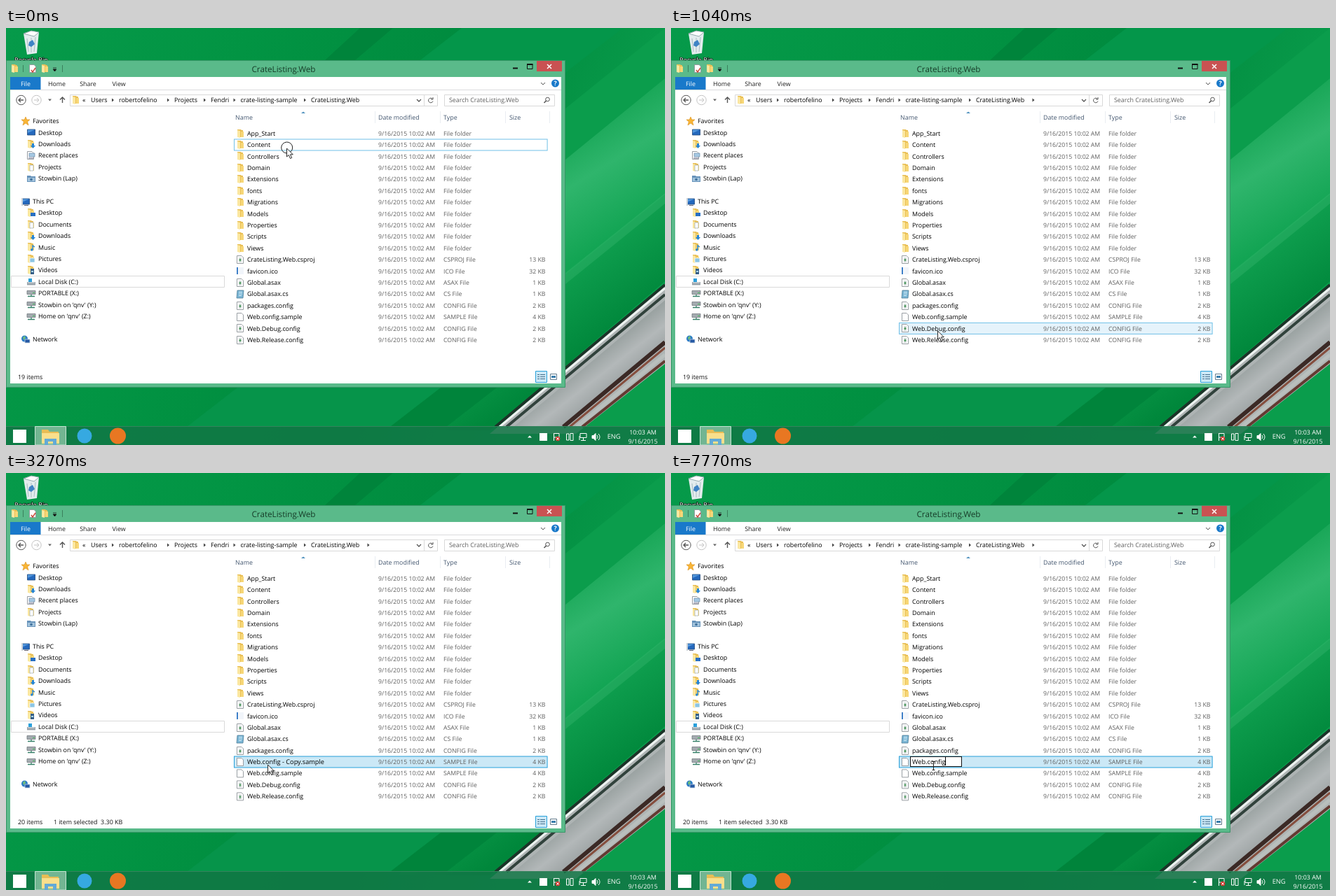
Recreate the animation shown at these times as an HTML page. Size 940 px wide and 596 px high, loop 8000 ms.

```html
<!DOCTYPE html>
<html lang="en">
<head>
<meta charset="utf-8">
<title>File window</title>
<style>
html, body { margin: 0; width: 100%; height: 100%; overflow: hidden; background: #088f45; }
svg { display: block; width: 100%; height: 100%; font: 8.9px "Open Sans", "Noto Sans", sans-serif; text-rendering: geometricPrecision; }
text { white-space: pre; }
.line { fill: none; stroke: #555; }
.meta { fill: #5f5f5f; font-size: 8.7px; }
.head { fill: #43566f; }
.white { fill: #fff; }
</style>
</head>
<body>
<svg viewBox="0 0 940 596" xmlns="http://www.w3.org/2000/svg">
<defs>
  <linearGradient id="sky" x2="1" y2=".25">
    <stop offset="0" stop-color="#069a4a"/><stop offset=".35" stop-color="#029443"/>
    <stop offset=".7" stop-color="#008a3e"/><stop offset="1" stop-color="#0a9d4c"/>
  </linearGradient>
  <linearGradient id="glow" gradientUnits="userSpaceOnUse" x1="815" y1="110" x2="915" y2="270">
    <stop offset="0" stop-color="#0d9f4c"/><stop offset=".5" stop-color="#2fb56c"/><stop offset="1" stop-color="#12a453"/>
  </linearGradient>
  <linearGradient id="deep" gradientUnits="userSpaceOnUse" x1="820" y1="300" x2="900" y2="410">
    <stop offset="0" stop-color="#12a453"/><stop offset="1" stop-color="#00873b"/>
  </linearGradient>
  <linearGradient id="steel" gradientUnits="userSpaceOnUse" x1="800" y1="482" x2="850" y2="546">
    <stop offset="0" stop-color="#8c9694"/><stop offset=".5" stop-color="#b3b8b9"/><stop offset="1" stop-color="#929999"/>
  </linearGradient>
  <clipPath id="picked"><rect id="pickedBox" y="406.5" height="12"/></clipPath>

  <symbol id="folder" overflow="visible">
    <path d="M1 0H6L7 1H9V11H1Z" fill="#e9bf55"/><path d="M1 1L5 2V12L1 11Z" fill="#fbe7a0"/><path d="M6 3H10V11H6Z" fill="#f7d778"/>
  </symbol>
  <symbol id="page" overflow="visible"><path d="M.5 .5H7L9.500 3V11.500H.5Z" fill="#fff" stroke="#8e9499" stroke-width=".9"/></symbol>
  <symbol id="config" overflow="visible">
    <use href="#page"/><path d="M3 4H7M3 9H7" stroke="#9aa" stroke-width=".8"/><circle cx="5" cy="6.5" r="1.7" fill="#579b67"/>
  </symbol>
  <symbol id="picture" overflow="visible"><path d="M0 1H2V11H0Z" fill="#3f80c8"/><path d="M3 1H10V11H3Z" fill="#f1f5fa"/></symbol>
  <symbol id="code" overflow="visible"><path d="M1 1H10L9 12H0Z" fill="#78b4d4" stroke="#517f99" stroke-width=".8"/><path d="M3 3.5H8M3 6H8M3 8.5H7" stroke="#d9eff8"/></symbol>
  <symbol id="star" overflow="visible"><path d="M6 0L7.7 4H12L8.7 7L10 12L6 9L2 12L3.3 7L0 4H4.3Z" fill="#f8b536" stroke="#d98d18" stroke-width=".6"/></symbol>
  <symbol id="screen" overflow="visible"><path d="M.5 2H11.5V10H.5Z" fill="#2468bd" stroke="#234a7d" stroke-width=".8"/><path d="M1 2.5H11L1 7Z" fill="#5397dc"/></symbol>
  <symbol id="pc" overflow="visible"><use href="#screen"/><path d="M0 1H2V12H0Z" fill="#cfd5da"/><path d="M4 11.5H10" stroke="#667"/></symbol>
  <symbol id="down" overflow="visible"><use href="#folder"/><path d="M7 5H10V8H12L8.5 12L5 8H7Z" fill="#2484d6"/></symbol>
  <symbol id="deskfolder" overflow="visible"><use href="#folder"/><path d="M5 6H12V11H5Z" fill="#286fc4"/></symbol>
  <symbol id="recent" overflow="visible"><use href="#page"/><path d="M3 3H11V8H3Z" fill="#a6c9e4" stroke="#6c8ca6" stroke-width=".7"/><path d="M2 10H9" stroke="#668"/></symbol>
  <symbol id="docs" overflow="visible"><use href="#folder"/><path d="M4 3H9V11H4Z" fill="#fff" stroke="#9ba6ae" stroke-width=".7"/></symbol>
  <symbol id="music" overflow="visible"><use href="#folder"/><path d="M8 3V10M8 4L11 6" stroke="#2484d6" stroke-width="1.4"/><circle cx="6.8" cy="10" r="1.7" fill="#2484d6"/></symbol>
  <symbol id="pics" overflow="visible"><use href="#folder"/><path d="M4 5H11V11H4Z" fill="#8bc5e4" stroke="#fff" stroke-width=".7"/></symbol>
  <symbol id="film" overflow="visible"><use href="#folder"/><path d="M5 4H10V12H5Z" fill="#365f88"/><path d="M6 7H9V9H6Z" fill="#acd6ed"/></symbol>
  <symbol id="shared" overflow="visible"><path d="M0 2H5L6 3H12V11H0Z" fill="#6793ba"/><path d="M1 5H11V10H1Z" fill="#a3c3dc"/><circle cx="6" cy="7.5" r="1.8" fill="#41729c"/></symbol>
  <symbol id="disk" overflow="visible"><path d="M2 1H7V6H2Z" fill="#2aa0db"/><path d="M0 6H12V10.5H0Z" fill="#9aa3aa"/><path d="M1 7H11" stroke="#e3e8ea"/></symbol>
  <symbol id="drive" overflow="visible"><path d="M0 2.5H12V7.5H0Z" fill="#a4abb0" stroke="#666e73" stroke-width=".7"/><path d="M6 8V11M1 10.5H11" stroke="#37816a" stroke-width="1.3"/><path d="M8 5.5H11" stroke="#42b557"/></symbol>
  <symbol id="net" overflow="visible"><circle cx="4.5" cy="5" r="4.5" fill="#2c7cc7"/><path d="M2 3L5 1L6 4L3 7Z" fill="#70bf79"/><path d="M5 6H12V11H5Z" fill="#2559a4" stroke="#c8d3df" stroke-width=".8"/></symbol>
</defs>

<!-- desktop -->
<rect width="940" height="596" fill="url(#sky)"/>
<path d="M505 0H552L498 46H455Z" fill="#00843b"/>
<path d="M650 0H880L790 70H560Z" fill="#04964a"/>
<path d="M798 115L940 0V72L798 188Z" fill="#0b9d4c"/>
<path d="M798 188L940 72V250L798 370Z" fill="url(#glow)"/>
<path d="M640 480L940 238V362L690 575H560Z" fill="url(#deep)"/>
<path d="M798 350L940 236V251L798 366Z" fill="#42bd78" opacity=".3"/>
<path d="M330 514H620L548 570H258Z" fill="#06944a"/>
<path d="M620 514H700L628 570H548Z" fill="#00843b"/>
<path d="M690 580L940 366V480L813 580Z" fill="#aeb4b4"/>
<path d="M698 570L940 367" stroke="#1c3328" stroke-width="4"/>
<path d="M704 570L940 372" stroke="#eef3f1" stroke-width="3"/>
<path d="M714 570L940 381" stroke="#31423c" stroke-width="4"/>
<path d="M724 570L940 389V447L793 570Z" fill="url(#steel)"/>
<path d="M795 570L940 449" stroke="#3b2925" stroke-width="6"/>
<path d="M804 570L940 457" stroke="#854e3e" stroke-width="3"/>
<path d="M814 570L940 467" stroke="#b9bfbd" stroke-width="5"/>
<path d="M822 570L940 476" stroke="#633a31" stroke-width="4"/>
<path d="M25 8L47 6L44 36L30 38Z" fill="#e3ecee"/>
<path d="M25 8L36 4L47 6L40 12Z" fill="#fff" stroke="#93a9ad"/>
<path d="M30 15L32 34M36 14V35M42 13L40 34" stroke="#a9bdc2"/>
<path d="M33 20L38 17L41 23L36 27L32 25Z" fill="#3f83c5"/>
<text x="36" y="49.3" text-anchor="middle" font-size="9.2" class="white" stroke="#062013" stroke-width="1.6" paint-order="stroke">Recycle Bin</text>

<!-- window -->
<path d="M.5 46.5H797.5V513.5H.5Z" fill="#5aba8a" stroke="#399668"/>
<path d="M6 70H792V508H6Z" class="white"/>
<use href="#folder" x="7" y="52"/><use href="#page" x="33" y="52"/><use href="#folder" x="50" y="52"/>
<path d="M36 60L38 63L42 57" fill="none" stroke="#cc4b3c" stroke-width="1.5"/>
<path d="M24.5 53V63M80.5 53V63" stroke="#3b805c"/>
<path d="M67 57H72M67 59L69.5 62L72 59Z" stroke="#222" stroke-width=".8"/>
<text x="396" y="62.5" text-anchor="middle" font-size="11.7" fill="#163c28">CrateListing.Web</text>
<path d="M757 47H793V62H757Z" fill="#c95252"/>
<path d="M772 52L778 58M778 52L772 58" stroke="#fff" stroke-width="1.5"/>
<path d="M723 57.5H730" stroke="#111" stroke-width="2"/>
<path d="M743.5 52H751V58.5H743.5Z" fill="none" stroke="#111"/><path d="M743 52H751.5" stroke="#111" stroke-width="2"/>
<path d="M6 70H49.5V88H6Z" fill="#1979ca"/>
<path d="M6 88.5H792" stroke="#dadbdc"/>
<g text-anchor="middle" fill="#222">
  <text x="28" y="83" class="white">File</text><text x="72.5" y="83">Home</text><text x="117" y="83">Share</text><text x="161" y="83">View</text>
</g>
<path d="M763 78L766 81L769 78" class="line"/>
<circle cx="783.5" cy="79" r="5.5" fill="#1878c9"/><text x="783.5" y="82.3" text-anchor="middle" font-weight="700" class="white">?</text>
<circle cx="21.5" cy="103" r="6.7" class="line"/><path d="M25 103H18M21 100L18 103L21 106" class="line" stroke-width="1.4"/>
<g opacity=".35"><circle cx="43.5" cy="103" r="6.7" class="line"/><path d="M40 103H47M44 100L47 103L44 106" class="line"/></g>
<path d="M60 101.5H65L62.5 104.5Z" fill="#666"/>
<path d="M80.5 107V99M77 102.5L80.5 99L84 102.5" class="line" stroke-width="1.4"/>
<path d="M91.5 95.5H615.5V111.5H91.5ZM596.5 96V111M625.5 95.5H782.5V111.5H625.5Z" fill="none" stroke="#d9d9d9"/>
<use href="#folder" x="94" y="97"/>
<path d="M586 102L589 105L592 102" class="line" stroke-width="1.3"/>
<path d="M608.5 101.5A3.3 3.3 0 1 0 609 104.5M609 99V102H606" class="line"/>
<text x="632" y="106" fill="#5f5f5f">Search CrateListing.Web</text>
<circle cx="772.5" cy="102" r="2.8" class="line"/><path d="M770.5 104L767.5 107" class="line" stroke-width="1.6"/>
<g id="crumbs"></g>
<path id="lastArrow" d="M515.5 100.5V105.5L518.5 103Z" fill="#444"/>
<path d="M7.5 354.5H311.5V370.5H7.5Z" fill="none" stroke="#d9d9d9"/>
<g id="tree"></g>
<g class="head"><text x="327" y="131">Name</text><text x="531" y="131">Date modified</text><text x="624" y="131">Type</text><text x="718" y="131">Size</text></g>
<path d="M526.5 119V136M619.5 119V136M712.5 119V136M775.5 119V136" stroke="#e9edf2"/>
<path d="M421 122L424 119.5L427 122Z" fill="#4d90bd"/>
<rect id="mark" x="325.5" width="446.6" height="16"/>
<g id="files"></g>
<g id="editor">
  <rect id="field" x="341.5" y="405.5" height="14" fill="#fff" stroke="#111"/>
  <text class="draft" x="344" y="415.8" font-size="9.2"></text>
  <g clip-path="url(#picked)"><path d="M341 405H478V420H341Z" fill="#3399ff"/><text class="draft white" x="344" y="415.8" font-size="9.2"></text></g>
  <rect id="caret" y="406" width="1" height="12"/>
</g>
<text id="count" x="17" y="502" fill="#111"></text>
<text id="chosen" x="68" y="502" fill="#111">1 item selected  3.30 KB</text>
<path d="M755.5 490.5H771.5V506.5H755.5Z" fill="#cbe8f6" stroke="#26a0da"/>
<path d="M758 495.5H761M758 498.5H761M758 501.5H761M762 495.5H769M762 498.5H769M762 501.5H769" stroke="#466e8b"/>
<path d="M776.5 494.5H785.5V502.5H776.5Z" fill="#fff" stroke="#627b8c"/><path d="M778 497H784V500H778Z" fill="#397dac"/>

<!-- taskbar -->
<path d="M0 569H940V596H0Z" fill="#117746" opacity=".84"/><path d="M0 569.5H940" stroke="#35835d"/>
<path d="M10 574H29V593H10Z" class="white"/>
<path d="M41.5 569.5H85.5V596H41.5Z" fill="#a8d4bc" fill-opacity=".65" stroke="#c4e4d2"/>
<path d="M51 574H60L62 577H75V594H51Z" fill="#e8bd55"/><path d="M51 579H76V594H51Z" fill="#f9df8c"/><path d="M55 587H72V596H67V591H60V596H55Z" fill="#63aad6"/>
<circle cx="112" cy="583" r="10.5" fill="#36a9e1"/><circle cx="159.5" cy="583" r="11.5" fill="#e87722"/>
<g fill="none" stroke="#fff">
  <path d="M744 585.5L747 582.5L750 585.5Z" fill="#fff" stroke="none"/>
  <path d="M761 579H772V590H761Z" fill="#fff" stroke="none"/>
  <path d="M781.5 579V590M782 579.5H789V585H782"/>
  <path d="M799.5 580V589H803V580ZM805 579.5H809V589.5H805Z"/>
  <path d="M819 579.5H828V585.5H819ZM823.5 586V589.5M820 589.5H827M818 583V589"/>
  <path d="M836 582.5H838L841 579.5V589.5L838 586.5H836Z" fill="#fff"/><path d="M843 582Q845 584.5 843 587M845 580Q849 584.5 845 589"/>
</g>
<circle cx="787" cy="587" r="3.3" fill="#d23b34"/><path d="M785.5 585.5L788.5 588.5M788.5 585.5L785.5 588.5" stroke="#fff"/>
<g class="white" text-anchor="middle"><text x="867" y="587" font-size="9.2">ENG</text><text x="908.5" y="581">10:03 AM</text><text x="908.5" y="594">9/16/2015</text></g>

<circle id="ring" r="8" fill="none" stroke="#222"/>
<path id="arrow" d="M0 0V12L2.800 9.5L5 14.5L7.2 13.5L5 8.8H8.8Z" fill="#fff" stroke="#111" stroke-width=".9"/>
<path id="beam" d="M372.5 412.5H374L374.5 413L375 412.5H376.5M374.5 413V424M372.5 424.5H376.5" fill="none" stroke="#222"/>
</svg>
<script>
const NS = 'http://www.w3.org/2000/svg';
const PITCH = 16.4, LOOP = 8000, COPY_ROW = 16;
const COPY_NAME = 'Web.config - Copy.sample';
const $ = id => document.getElementById(id);

function add(parent, tag, attrs, text = '') {
  const node = document.createElementNS(NS, tag);
  for (const key in attrs) node.setAttribute(key, attrs[key]);
  node.textContent = text;
  return parent.appendChild(node);
}
function show(id, on) { $(id).style.display = on ? '' : 'none'; }
function set(id, attrs) { for (const key in attrs) $(id).setAttribute(key, attrs[key]); }

// Address bar
const crumbs = [[109, '«'], [121, 'Users'], [161, 'robertofelino'], [240, 'Projects'], [292, 'Fendri'],
  [334.5, 'crate-listing-sample'], [435, 'CrateListing.Web']];
crumbs.forEach(([x, name], i) => {
  add($('crumbs'), 'text', { x, y: 106 }, name);
  if (i > 1) add($('crumbs'), 'path', { d: `M${x - 10} 100.5v5l3 -2.5Z`, fill: '#444' });
});

// Navigation tree; empty entries are gaps
const tree = ['*star:Favorites', 'screen:Desktop', 'down:Downloads', 'recent:Recent places', 'docs:Projects',
  'shared:Stowbin (Lap)', '', '*pc:This PC', 'deskfolder:Desktop', 'docs:Documents', 'down:Downloads',
  'music:Music', 'pics:Pictures', 'film:Videos', 'disk:Local Disk (C:)', 'drive:PORTABLE (X:)',
  "drive:Stowbin on 'qnv' (Y:)", "drive:Home on 'qnv' (Z:)", '', '*net:Network'];
tree.forEach((entry, i) => {
  if (!entry) return;
  const [, root, icon, name] = entry.match(/^(\*?)(\w+):(.*)$/);
  const x = root ? 22 : 30, y = 133 + PITCH * i;
  add($('tree'), 'use', { href: '#' + icon, x, y: Math.round(y - 6) });
  add($('tree'), 'text', { x: x + 16, y: y + 3.2 }, name);
});

// File list
function fileRow(index, icon, name, type, size = '') {
  const row = add($('files'), 'g', {});
  const y = 150.5 + PITCH * index, base = y + 3.2;
  add(row, 'use', { href: '#' + icon, x: 329, y: Math.round(y - 6) });
  add(row, 'text', { x: 344, y: base, 'font-size': name === COPY_NAME ? 9.2 : 8.9 }, name);
  add(row, 'text', { x: 531, y: base, class: 'meta' }, '9/16/2015 10:02 AM');
  add(row, 'text', { x: 624, y: base, class: 'meta' }, type);
  add(row, 'text', { x: 769.5, y: base, class: 'meta', 'text-anchor': 'end' }, size);
  return row;
}
const folders = 'App_Start Content Controllers Domain Extensions fonts Migrations Models Properties Scripts Views'.split(' ');
const files = [
  ['config', 'CrateListing.Web.csproj', 'CSPROJ File', '13 KB'],
  ['picture', 'favicon.ico', 'ICO File', '32 KB'],
  ['config', 'Global.asax', 'ASAX File', '1 KB'],
  ['code', 'Global.asax.cs', 'CS File', '1 KB'],
  ['config', 'packages.config', 'CONFIG File', '2 KB'],
  ['page', 'Web.config.sample', 'SAMPLE File', '4 KB'],
  ['config', 'Web.Debug.config', 'CONFIG File', '2 KB'],
  ['config', 'Web.Release.config', 'CONFIG File', '2 KB']];
const rows = [...folders.map(name => ['folder', name, 'File folder']), ...files].map((row, i) => fileRow(i, ...row));
const copyRow = fileRow(COPY_ROW, 'page', COPY_NAME, 'SAMPLE File', '4 KB');
const copyLabel = copyRow.querySelector('text');

// Each step changes part of the state and holds until the next one
const steps = [
  [0, { x: 400, y: 172, ring: true, mark: 'focus' }],
  [150, { ring: false, mark: 'hover', opened: true }],
  [300, { x: 404, y: 262 }],
  [450, { x: 402, y: 420 }],
  [600, { x: 394, y: 505 }],
  [750, { x: 384, y: 441 }],
  [900, { x: 380, y: 433 }],
  [1050, { x: 377, y: 424 }],
  [1190, { x: 375, y: 420 }],
  [1330, { ring: true, mark: 'selected' }],
  [1480, { ring: false }],
  [1620, { x: 374, y: 419 }],
  [1770, { x: 373, y: 417 }],
  [3270, { pasted: true }],
  [4170, { ring: true }],
  [4320, { ring: false }],
  [4620, { draft: COPY_NAME, field: 136, range: [344, 422], caret: 422 }],
  [5220, { caret: 0 }],
  [5670, { range: null, caret: 422 }],
  [5820, { caret: 417 }],
  [5970, { caret: 411 }],
  [6120, { caret: 405 }],
  [6270, { caret: 399 }],
  [6420, { caret: 394 }],
  [6870, { caret: 391 }],
  [7320, { range: [391, 455], caret: 0 }],
  [7770, { draft: 'Web.config', field: 73, range: null, caret: 391 }]];
const looks = {
  focus: { fill: '#fff', stroke: '#70c0e7' },
  hover: { fill: '#e5f3fb', stroke: '#70c0e7' },
  selected: { fill: '#cbe8f6', stroke: '#26a0da' }
};

function render(s) {
  const row = s.mark === 'selected' ? COPY_ROW : Math.floor((s.y - 142.3) / PITCH);
  show('mark', row < rows.length);
  set('mark', { y: 142.6 + PITCH * row, ...looks[s.mark] });
  show('lastArrow', s.opened);
  show('chosen', s.mark === 'selected');
  $('count').textContent = (s.pasted ? 20 : 19) + ' items';
  copyRow.style.display = s.pasted ? '' : 'none';
  copyLabel.style.display = s.draft ? 'none' : '';
  rows.slice(COPY_ROW).forEach(r => r.setAttribute('transform', `translate(0 ${s.pasted ? PITCH : 0})`));

  show('editor', s.draft);
  document.querySelectorAll('.draft').forEach(t => { t.textContent = s.draft || ''; });
  const [from, to] = s.range || [0, 0];
  set('pickedBox', { x: from, width: to - from });
  set('field', { width: s.field || 0 });
  show('caret', s.caret);
  set('caret', { x: s.caret || 0 });

  show('ring', s.ring);
  set('ring', { cx: s.x + 0.7, cy: s.y - 1 });
  show('arrow', !s.draft);
  set('arrow', { transform: `translate(${s.x + 0.5} ${s.y})` });
  show('beam', s.draft);
}

let shown = -1;
const start = performance.now();
function tick() {
  const time = (performance.now() - start) % LOOP;
  const count = steps.filter(([at]) => at <= time).length;
  if (count !== shown) {
    shown = count;
    render(Object.assign({}, ...steps.slice(0, count).map(step => step[1])));
  }
  requestAnimationFrame(tick);
}
tick();
</script>
</body>
</html>
```
